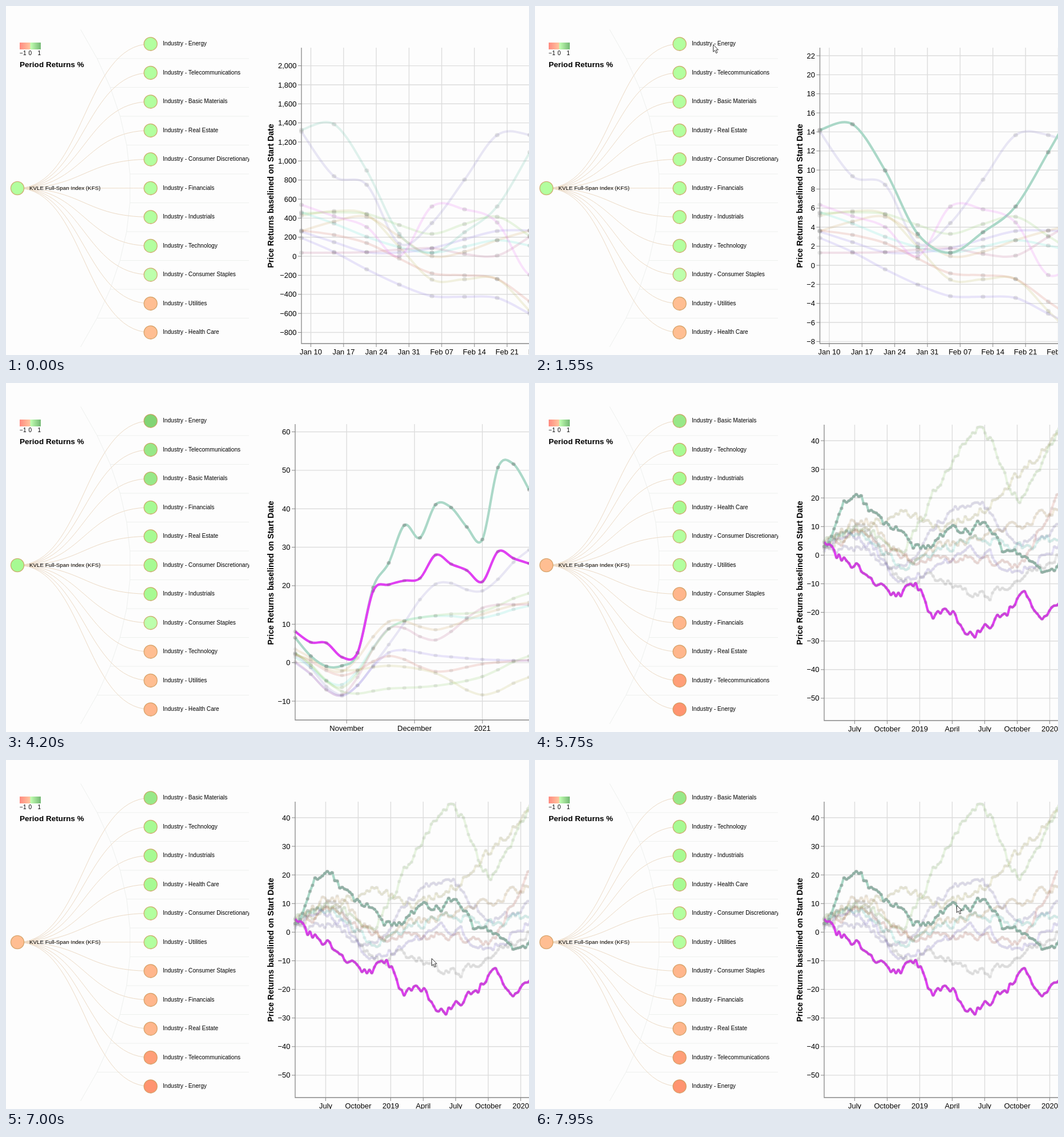
An HTML page for the animation above (8 s loop, 917x611 px).

```html
<!DOCTYPE html>
<html lang="en">
<head>
<meta charset="utf-8">
<title>Industry returns</title>
<style>
html, body { margin: 0; width: 100%; height: 100%; overflow: hidden; background: #fdfdfd; }
svg { display: block; width: 917px; height: 611px; font-family: "Liberation Sans", Arial, sans-serif; }
path { fill: none; }
</style>
</head>
<body>
<svg id="stage" viewBox="0 0 917 611"></svg>
<script>
const W = 917, H = 611, LOOP = 8000;
const TEAL = '#abd8c8', MAGENTA = '#e040f2';
const HUE = {
  green: '#6cc03c', olive: '#a8a030', violet: '#6d5cc0', blue: '#6a50e0', red: '#c8452f',
  mint: '#2fd8c4', mauve: '#a83c70', tan: '#c08830', grey: '#777777', pink: '#e040f2', sea: '#2aa88a'
};
const stage = document.getElementById('stage');

const r1 = v => Math.round(v * 10) / 10;
const lerp = (a, b, k) => a + (b - a) * k;
const mix = (a, b, k) => [lerp(a[0], b[0], k), lerp(a[1], b[1], k)];
const ease = k => k * k * (3 - 2 * k);
const text = (x, y, size, str, extra = '') =>
  `<text x="${x}" y="${y}" font-size="${size}" ${extra}>${str}</text>`;
const path = (d, stroke, width, extra = '') =>
  `<path d="${d}" stroke="${stroke}" stroke-width="${width}" ${extra}/>`;

// ---------- series ----------
// Cardinal spline through the points
function spline(p) {
  const last = p.length - 1;
  let d = `M${p[0]}`;
  for (let i = 0; i < last; i++) {
    const a = p[Math.max(i - 1, 0)], b = p[i], c = p[i + 1], e = p[Math.min(i + 2, last)];
    const c1 = [0, 1].map(k => r1(b[k] + (c[k] - a[k]) / 6));
    const c2 = [0, 1].map(k => r1(c[k] - (e[k] - b[k]) / 6));
    d += `C${c1} ${c2} ${c}`;
  }
  return d;
}

// Height at k (0..1) on a smooth curve through evenly spaced heights
function heightAt(ys, k) {
  const last = ys.length - 1, pos = k * last, i = Math.min(Math.floor(pos), last - 1), u = pos - i;
  const b = ys[i], c = ys[i + 1], a = ys[i - 1] ?? b, e = ys[i + 2] ?? c;
  const m = (c - a) / 2, n = (e - b) / 2;
  return b + u * (m + u * (3 * (c - b) - 2 * m - n + u * (2 * (b - c) + m + n)));
}

// Weekly readings, with a seeded random drift around the curve
function readings(o, ys, amp = 0) {
  let seed = ys.reduce((s, y, i) => s + y * (i + 7) * 911, 1), drift = 0;
  return Array.from({ length: o.weeks + 1 }, (_, i) => {
    seed = seed * 16807 % 2147483647;
    drift = drift * .55 + (seed / 2147483647 - .5) * amp;
    return [r1(o.x + i * o.week), r1(heightAt(ys, i / o.weeks) + drift)];
  });
}

const dots = (p, size, alpha) =>
  path(p.map(([x, y]) => `M${x - .6} ${y}h1.2`).join(''), '#555', size,
    `stroke-linecap="round" stroke-opacity="${alpha}"`);
const faint = (o, hue, ...ys) => {
  const p = readings(o, ys, o.drift);
  return path(spline(p), HUE[hue], 4, 'stroke-opacity=".14"') + dots(p, o.dot, o.dotAlpha);
};
const strong = (o, hue, dotAlpha, ...ys) => {
  const p = readings(o, ys, o.drift);
  return path(spline(p), hue, 4.2, 'stroke-linejoin="round"') + dots(p, o.dot, dotAlpha);
};

// ---------- chart frame ----------
function chart(o, body) {
  let grid = '', axis = '';
  for (let y = o.firstY, v = o.first; y < o.bottom; y += o.gap, v -= o.step) {
    const label = v.toLocaleString('en-US').replace('-', '\u2212');
    grid += `M${o.x} ${r1(y)}H${W}`;
    axis += path(`M${o.x - 6} ${r1(y)}h6`, '#888', 1) +
      text(o.x - 8.5, r1(y + 4.5), 13, label, 'text-anchor="end"');
  }
  o.dates.forEach((label, i) => {
    const x = r1(o.dateX + i * o.dateGap);
    grid += `M${x} ${o.top}V${o.bottom}`;
    axis += path(`M${x} ${o.bottom}v6`, '#888', 1) +
      text(x, o.bottom + 19.3, 13, label, 'text-anchor="middle"');
  });
  axis += path(`M${o.x} ${o.top}V${o.bottom}H${W}`, '#888', 1.3);
  return `<g class="chart" display="none">${path(grid, '#ddd', 1.4)}
    <g clip-path="url(#plot)">${body}</g>${axis}</g>`;
}

const frame = { top: 73, bottom: 591 };
const winter = {
  ...frame, weeks: 8, week: 57.2, drift: 0, dot: 7, dotAlpha: .15, dateGap: 57.35,
  dates: ['Jan 10', 'Jan 17', 'Jan 24', 'Jan 31', 'Feb 07', 'Feb 14', 'Feb 21', 'Feb 28']
};
const wide = { ...winter, x: 518, dateX: 534.5, first: 2000, step: 200, firstY: 104.6, gap: 33.35 };
const narrow = { ...winter, x: 499.5, dateX: 516, first: 22, step: 2, firstY: 87, gap: 33.36 };
const autumn = {
  x: 507, top: 72, bottom: 590, weeks: 15, week: 27.35, drift: 0, dot: 6, dotAlpha: .1,
  first: 60, step: 10, firstY: 85.5, gap: 67.35,
  dateX: 597.3, dateGap: 119, dates: ['November', 'December', '2021']
};
const years = {
  ...frame, x: 507, weeks: 95, week: 4.34, drift: 15, dot: 5.4, dotAlpha: .09,
  first: 40, step: 10, firstY: 101, gap: 50.1,
  dateX: 560.5, dateGap: 57, dates: ['July', 'October', '2019', 'April', 'July', 'October', '2020']
};

function winterLines(o, teal, magenta) {
  const energy = [217, 207, 288, 399, 432, 396, 351, 256, 155];
  const telecom = [348, 368, 387, 438, 351, 356, 379, 471, 440];
  return faint(o, 'violet', 220, 298, 313, 416, 380, 304, 226, 226, 250) +
    faint(o, 'blue', 406, 461, 508, 511, 566) +
    faint(o, 'red', 393, 415, 468, 478, 556) +
    faint(o, 'olive', 367, 365, 479, 478, 590) +
    faint(o, 'green', 363, 364, 399, 369, 440) +
    faint(o, 'mint', 361, 404, 432, 410, 432) +
    faint(o, 'blue', 395, 431, 424, 394, 396) +
    faint(o, 'mauve', 432, 431, 424, 437, 370) +
    faint(o, 'tan', 394, 369, 438, 410, 380) +
    (teal ? strong(o, TEAL, .32, ...energy) : faint(o, 'sea', ...energy)) +
    (magenta ? strong(o, MAGENTA, .06, ...telecom) : faint(o, 'pink', ...telecom));
}
function autumnLines(o) {
  return faint(o, 'violet', 474, 546, 458, 352, 364, 292) +
    faint(o, 'mint', 480, 528, 430, 408, 411, 390) +
    faint(o, 'green', 472, 533, 431, 407, 400, 368) +
    faint(o, 'tan', 466, 505, 418, 432, 405, 384) +
    faint(o, 'mauve', 488, 546, 430, 450, 394, 388) +
    faint(o, 'red', 475, 512, 478, 505, 492, 485) +
    faint(o, 'blue', 490, 548, 472, 477, 484, 486) +
    faint(o, 'green', 473, 540, 535, 530, 514, 478) +
    faint(o, 'olive', 476, 503, 495, 508, 546, 515) +
    strong(o, TEAL, .32, 446, 478, 496, 495, 473, 358, 315, 249, 271, 213, 218, 252, 274, 148, 142, 187) +
    strong(o, MAGENTA, .2, 435, 454, 455, 480, 472, 364, 353, 346, 342, 301, 317, 328, 348, 295, 307, 316);
}
function yearLines(o) {
  return faint(o, 'green', 282, 256, 288, 168, 80, 200, 82) +
    faint(o, 'olive', 285, 255, 228, 250, 222, 160, 92) +
    faint(o, 'violet', 288, 288, 325, 238, 216, 280, 255) +
    faint(o, 'red', 285, 268, 304, 305, 308, 312, 200) +
    faint(o, 'grey', 284, 252, 348, 340, 372, 346, 300) +
    faint(o, 'blue', 290, 275, 342, 318, 294, 328, 280) +
    faint(o, 'mint', 282, 268, 318, 295, 272, 288, 272) +
    faint(o, 'tan', 284, 240, 302, 286, 270, 248, 222) +
    strong(o, TEAL, .3, 290, 210, 207, 240, 250, 283, 280, 252, 258, 240, 298, 304, 325, 325) +
    strong(o, MAGENTA, .15, 281, 310, 326, 350, 375, 350, 405, 402, 440, 428, 406, 375, 400, 395);
}

// ---------- tree ----------
const rowY = i => 66.4 + 50.5 * i;
function treeBase() {
  let cells = '', curve = '', links = '';
  for (let i = 0; i < 12; i++) {
    const y = 41.5 + 50.5 * i, x = r1(218 - .00113 * (y - 319) ** 2);
    curve += `${i ? 'L' : 'M'}${x} ${y}`;
    if (i > 0 && i < 11) cells += `M${x} ${y}H426`;
    if (i < 11) links += `M20 319C136.8 319 136.8 ${rowY(i)} 253.5 ${rowY(i)}`;
  }
  return path(cells + curve, '#eef0ee', 1) + path(links, '#ecdac5', 1);
}
const node = (x, y, fill) =>
  `<circle cx="${x}" cy="${y}" r="11.6" fill="${fill}" stroke="#c8924f" stroke-opacity=".75" stroke-width="1.3"/>`;
function tree(names, fills, root) {
  const rows = names.split(', ').map((name, i) =>
    node(253.5, rowY(i), fills[i]) + text(275, rowY(i) + 2.9, 10.1, 'Industry - ' + name));
  return `<g class="tree" display="none" clip-path="url(#left)">${node(20, 319, root)}${rows.join('')}</g>`;
}
const fill = (n, c) => Array(n).fill(c);
const LIME = '#b3ff9f', PALE = '#bdffac', GRASS = '#a7fa93', LEAF = '#98e888', PEACH = '#ffbe92', CORAL = '#ffb68c';
const trees =
  tree('Energy, Telecommunications, Basic Materials, Real Estate, Consumer Discretionary, Financials, ' +
    'Industrials, Technology, Consumer Staples, Utilities, Health Care',
    [...fill(8, LIME), PALE, PEACH, PEACH], LIME) +
  tree('Energy, Telecommunications, Basic Materials, Financials, Real Estate, Consumer Discretionary, ' +
    'Industrials, Consumer Staples, Technology, Utilities, Health Care',
    ['#82d474', LEAF, LEAF, ...fill(4, GRASS), PALE, PEACH, PEACH, CORAL], GRASS) +
  tree('Basic Materials, Technology, Industrials, Health Care, Consumer Discretionary, Utilities, ' +
    'Consumer Staples, Financials, Real Estate, Telecommunications, Energy',
    [LEAF, ...fill(3, GRASS), LIME, LIME, ...fill(3, CORAL), '#ff9f78', '#ff9470'], PEACH);

const legend = `<rect x="24" y="64" width="37" height="12" fill="url(#scale)"/>` +
  text(24, 86, 10.1, '\u22121') +
  text(42.3, 86, 10.1, '0', 'text-anchor="middle"') +
  text(58.3, 86, 10.1, '1', 'text-anchor="middle"') +
  text(24, 107, 13.55, 'Period Returns %', 'font-weight="bold"');

stage.innerHTML = `<defs>
  <linearGradient id="scale"><stop offset="0" stop-color="#ff8a80"/><stop offset=".48" stop-color="#ffc49e"/>
  <stop offset=".52" stop-color="#c2ffb2"/><stop offset="1" stop-color="#74b874"/></linearGradient>
  <clipPath id="left"><rect width="426.5" height="${H}"/></clipPath>
  <clipPath id="plot"><rect x="495" y="60" width="422" height="532"/></clipPath></defs>
  <rect width="${W}" height="${H}" fill="#fdfdfd"/>` +
  treeBase() + trees + text(41, 322.4, 9.8, 'KVLE Full-Span Index (KFS)') + legend +
  text(0, 0, 14.1, 'Price Returns baselined on Start Date',
    'font-weight="bold" text-anchor="middle" transform="translate(469 332.5) rotate(-90)"') +
  chart(wide, winterLines(wide, false, false)) +
  chart(narrow, winterLines(narrow, true, false)) +
  chart(narrow, winterLines(narrow, true, true)) +
  chart(autumn, autumnLines(autumn)) +
  chart(years, yearLines(years)) +
  `<circle id="press" r="9.7" fill="#ffff00" fill-opacity=".45"/>
  <path id="cursor" d="M.5 .5V13.2L3.4 10.6L5.6 15.6L7.8 14.6L5.6 9.8H9.4Z" style="fill:#fff" stroke="#333"/>`;

// ---------- time ----------
const charts = [...stage.querySelectorAll('.chart')], layouts = [...stage.querySelectorAll('.tree')];
const cursor = document.getElementById('cursor'), press = document.getElementById('press');
const show = (el, on) => el.setAttribute('display', on ? 'inline' : 'none');
const place = (el, p) => {
  show(el, p);
  if (p) el.setAttribute('transform', `translate(${r1(p[0])} ${r1(p[1])})`);
};

function bezier(a, b, c, d, k) {
  const ab = mix(a, b, k), bc = mix(b, c, k), cd = mix(c, d, k);
  return mix(mix(ab, bc, k), mix(bc, cd, k), k);
}
function pointer(t) {
  const energy = [312, 67], telecom = [312, 122], low = [746, 347], rest = [745, 332];
  if (t < 150 || (t >= 3200 && t < 6400)) return null;
  if (t < 800) return bezier([908, 576], [330, 560], [-95, 330], energy, ease((t - 100) / 700));
  if (t < 2000) return energy;
  if (t < 2100) return mix(energy, telecom, (t - 1950) / 150);
  if (t < 3150) return telecom;
  if (t < 3200) return [500, 161];
  if (t < 7000) return mix([910, 465], low, ease((t - 6400) / 600));
  if (t < 7200) return mix(low, rest, (t - 7000) / 200);
  return mix(rest, [739, 254], ease(Math.min((t - 7200) / 750, 1)));
}
function clicked(t) {
  if (t >= 1100 && t < 1200) return [312, 67.5];
  if (t >= 2450 && t < 2550) return [312, 123];
  return null;
}
function draw(now) {
  const t = Math.floor((now % LOOP) / 50) * 50;
  const scene = [1550, 2850, 4200, 5750].filter(s => t >= s).length;
  charts.forEach((c, i) => show(c, i === scene));
  layouts.forEach((g, i) => show(g, i === Math.max(scene - 2, 0)));
  place(cursor, pointer(t));
  place(press, clicked(t));
}
let start;
function tick(now) {
  start ??= now;
  draw(now - start);
  requestAnimationFrame(tick);
}
draw(0);
requestAnimationFrame(tick);
</script>
</body>
</html>
```
